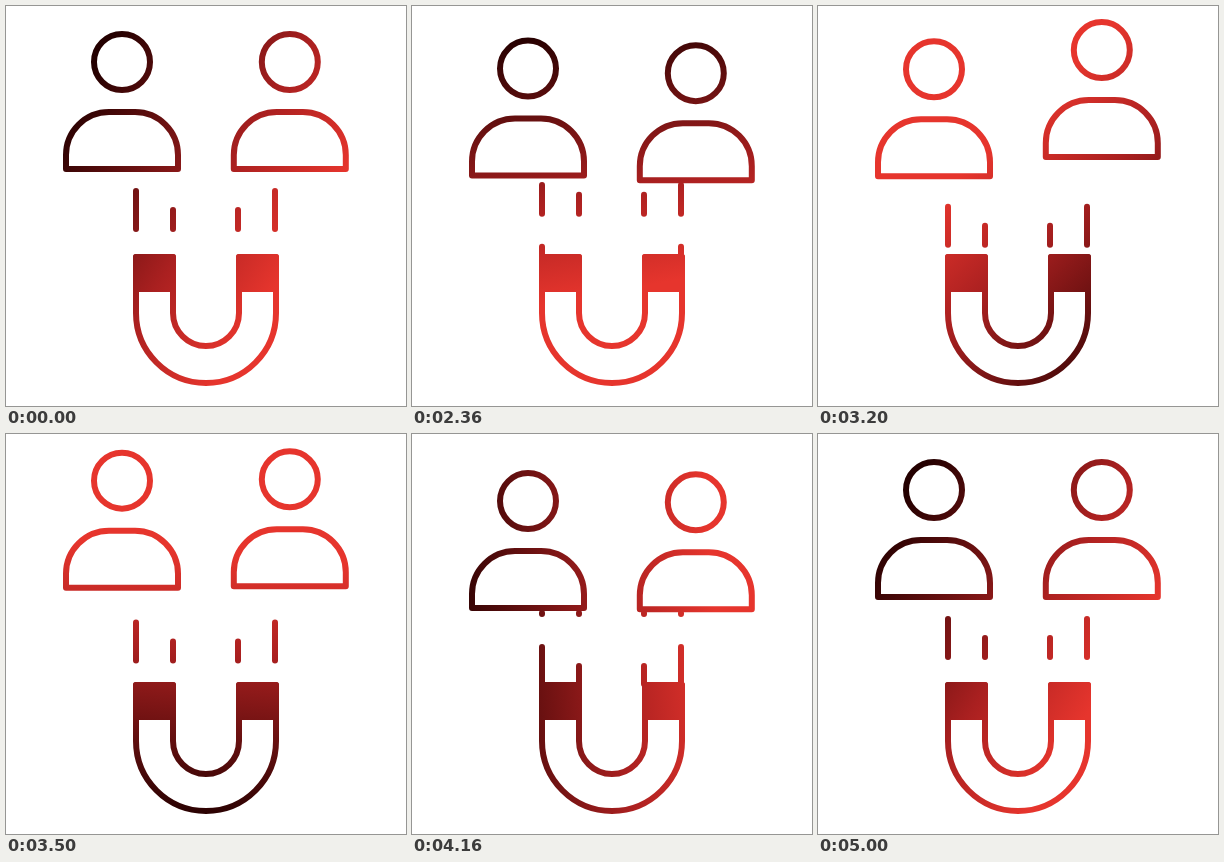
Animation, 400 px wide and 400 px high, one loop 5.03 s. Source, as an HTML page:

```html
<!DOCTYPE html>
<html lang="en">
<head>
<meta charset="utf-8">
<title>Magnet attracting people</title>
<style>
  html, body { margin: 0; width: 100%; height: 100%; overflow: hidden; background: #fff; }
  svg { display: block; width: 100vw; height: 100vh; }
</style>
</head>
<body>
<svg viewBox="0 0 400 400" fill="none" stroke="url(#shade)" stroke-width="6" stroke-linecap="round" stroke-linejoin="round">
  <defs>
    <linearGradient id="shade" gradientUnits="userSpaceOnUse" x1="35" y1="200" x2="305" y2="200">
      <stop offset="0" stop-color="#240000"/>
      <stop offset=".63" stop-color="#aa2020"/>
      <stop offset="1" stop-color="#e6352d"/>
    </linearGradient>
  </defs>
  <g id="field"></g>
  <path id="left" fill="#fff"/>
  <path id="right" fill="#fff"/>
  <path d="M130 251V307A70 70 0 0 0 270 307V251H233V307A33 33 0 0 1 167 307V251Z"/>
  <path fill="url(#shade)" d="M130 251H167V283H130ZM233 251H270V283H233Z"/>
</svg>
<script>
const LOOP = 5030, START = 2030, STEP = 30, STEPS = 100;
const LINE_TOP = 179, LINE_END = 250, PERIOD = 71, CYCLES = 6;
const $ = id => document.getElementById(id);
const shade = $('shade');

// [step, vertical offset] turning points of each person's bob
const leftBob = [[0, 0], [29, 18], [57, -14], [76, 14], [100, 0]];
const rightBob = [[0, 0], [20, 17], [44, -14], [70, 12.5], [100, 0]];

function bob(keys, n) {
  const i = Math.max(1, keys.findIndex(k => k[0] >= n));
  const [n0, y0] = keys[i - 1], [n1, y1] = keys[i];
  return y0 + (y1 - y0) * (1 - Math.cos(Math.PI * (n - n0) / (n1 - n0))) / 2;
}

// Cubic Bezier easing, solved for x by bisection
function ease(x, x1 = .3, y1 = .265, x2 = .55, y2 = 1) {
  if (x <= 0 || x >= 1) return x <= 0 ? 0 : 1;
  const curve = (s, a, b) => 3 * (1 - s) ** 2 * s * a + 3 * (1 - s) * s * s * b + s ** 3;
  let lo = 0, hi = 1;
  for (let i = 0; i < 24; i++) {
    const mid = (lo + hi) / 2;
    if (curve(mid, x1, x2) < x) lo = mid; else hi = mid;
  }
  return curve(lo, y1, y2);
}

function person(x, dy) {
  const head = `M${x - 28} ${56 + dy}a28 28 0 1 1 56 0a28 28 0 1 1 -56 0Z`;
  const body = `M${x - 56} ${163 + dy}v-14a43 43 0 0 1 43 -43h26a43 43 0 0 1 43 43v14Z`;
  return head + body;
}

const lines = [[130, 38], [167, 19], [232, 19], [269, 38]].map(([x, dash]) => {
  const el = document.createElementNS('http://www.w3.org/2000/svg', 'path');
  el.setAttribute('d', `M${x} ${LINE_TOP}V${LINE_END}`);
  el.setAttribute('stroke-dasharray', `${dash} ${PERIOD - dash}`);
  $('field').append(el);
  return { el, rest: 223 - dash - LINE_TOP };
});

function draw(time) {
  const t = time % LOOP;
  const n = t < START ? 0 : Math.min(STEPS, 1 + Math.floor((t - START) / STEP));
  const p = ease(n / STEPS);
  shade.setAttribute('gradientTransform', `rotate(${32 + 360 * p} 225 200)`);
  $('left').setAttribute('d', person(116, bob(leftBob, n)));
  $('right').setAttribute('d', person(283.8, bob(rightBob, n)));
  for (const { el, rest } of lines) {
    const shift = (rest + PERIOD * CYCLES * p) % PERIOD;
    el.setAttribute('stroke-dashoffset', -shift);
  }
}

const began = performance.now();
function tick() {
  draw(performance.now() - began);
  requestAnimationFrame(tick);
}
tick();
</script>
</body>
</html>
```
